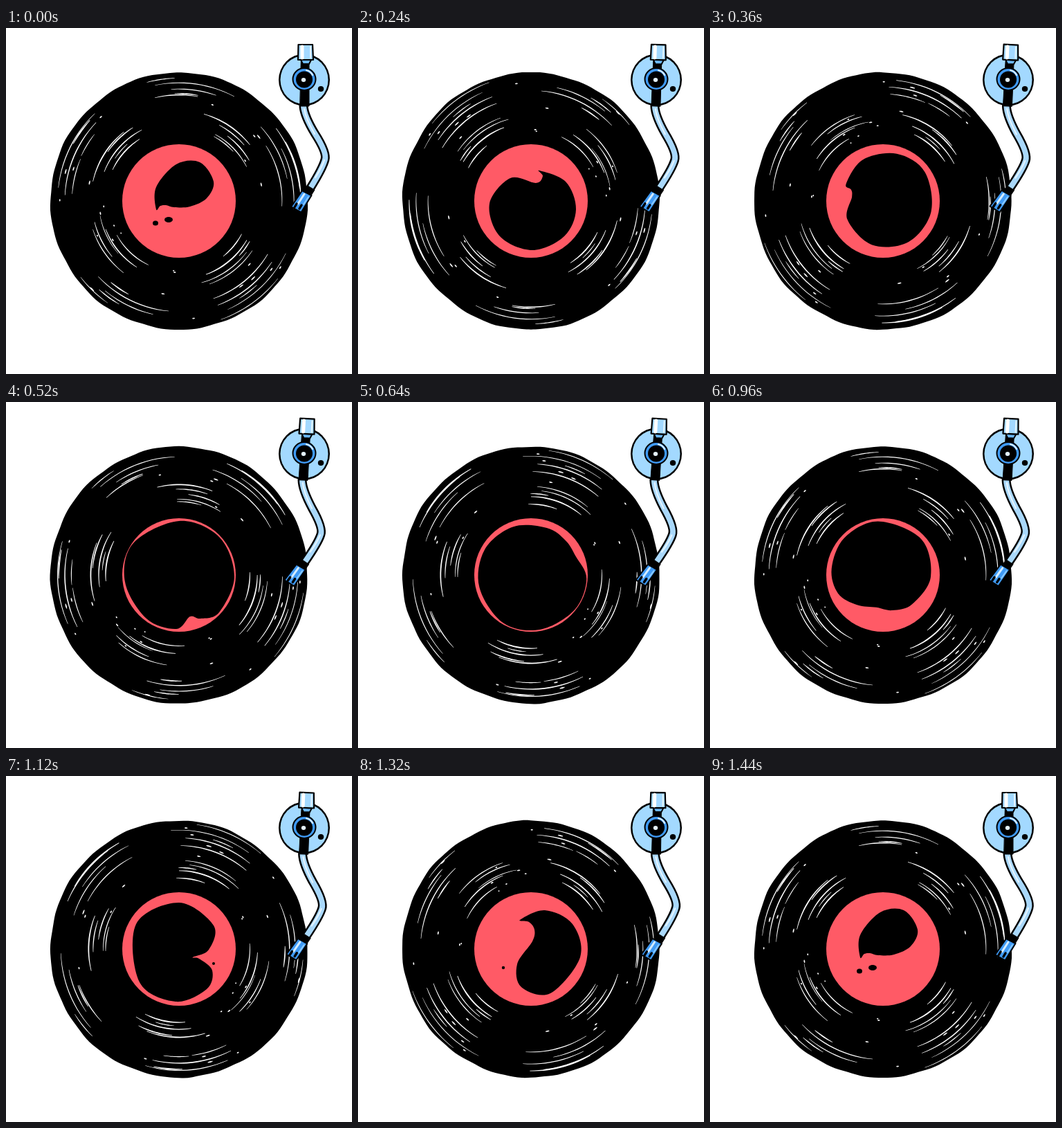
An HTML page with a canvas that plays this animation: 500x500 px, repeating every 1480 ms.

```html
<!DOCTYPE html>
<html lang="en">
<head>
<meta charset="utf-8">
<title>Spinning record</title>
<style>
  html, body { margin: 0; width: 100%; height: 100%; overflow: hidden; background: #fff; }
  canvas { display: block; width: 100vw; height: 100vh; }
</style>
</head>
<body>
<canvas id="stage" width="500" height="500"></canvas>
<script>
const ctx = document.getElementById('stage').getContext('2d');
const STEP = 40, STEPS = 37, SPIN = -30, C = 250, TAU = Math.PI * 2;
const RED = '#ff5a66', SKY = '#a3d9ff', BLUE = '#3f9af5', PALE = '#e4f4ff';
const rad = deg => deg * Math.PI / 180;
const polar = (r, deg) => [C + r * Math.cos(rad(deg)), C + r * Math.sin(rad(deg))];
const ringOf = (n, from, radius) => Array.from({ length: n }, (_, i) => {
  const deg = from + i * 360 / n;
  return polar(radius(rad(deg)), deg);
});

function seeded(seed) {
  return () => (seed = (seed * 16807) % 2147483647) / 2147483647;
}

// Ink poses: outline clockwise from its tip, and loose drops [x, y, rx, ry]
const tear = {
  at: 0,
  ink: [[217,262],[217,230],[246,197],[280,194],[300,222],
        [290,246],[266,258],[243,259],[231,256],[223,257]],
  drops: [[216,282,4,3.5],[235,277,6,4]]
};
const bowl = {
  at: 6,
  ink: [[262,206],[300,222],[315,262],[298,301],[252,321],
        [205,301],[190,254],[220,217],[257,224],[267,214]]
};
const ring = {
  at: 13,
  ink: [[246,328],[203,313],[172,260],[184,204],[250,172],
        [308,195],[330,252],[308,304],[281,313],[266,310]]
};
const full = {
  at: 20,
  ink: ringOf(10, 245, t => 82.7 - 1.4 * Math.cos(2 * t) - 0.7 * Math.cos(t + 0.5))
};
const hook = {
  at: 28,
  ink: [[279,264],[298,281],[290,308],[245,326],[193,298],
        [188,214],[250,183],[300,216],[293,251],[270,262]],
  drops: [[300,271,2,2]]
};
const comma = {
  at: 33,
  ink: [[234,208],[270,194],[310,214],[321,262],[278,314],
        [236,305],[230,272],[252,239],[255,222],[247,211]],
  drops: [[210,277,2.2,2.2]]
};
const poses = [tear, bowl, ring, full, hook, comma, { ...tear, at: 36 }];

function turn([x, y], deg) {
  const c = Math.cos(rad(deg)), s = Math.sin(rad(deg));
  return [C + (x - C) * c - (y - C) * s, C + (x - C) * s + (y - C) * c];
}

function rotated(x, y, deg, draw) {
  ctx.save();
  ctx.translate(x, y);
  ctx.rotate(rad(deg));
  ctx.translate(-x, -y);
  draw();
  ctx.restore();
}

function oval(x, y, rx, ry, fill) {
  ctx.beginPath();
  ctx.ellipse(x, y, rx, ry, 0, 0, TAU);
  ctx.fillStyle = fill;
  ctx.fill();
}

function poly(pts, fill, outline = 0) {
  ctx.beginPath();
  pts.forEach(p => ctx.lineTo(...p));
  ctx.closePath();
  ctx.fillStyle = fill;
  ctx.fill();
  if (outline) {
    ctx.strokeStyle = '#000';
    ctx.lineWidth = outline;
    ctx.stroke();
  }
}

function line(path, color, width) {
  ctx.strokeStyle = color;
  ctx.lineWidth = width;
  ctx.stroke(new Path2D(path));
}

// Closed Catmull-Rom curve
function blob(pts, fill) {
  const n = pts.length, at = i => pts[(i + n) % n];
  ctx.beginPath();
  ctx.moveTo(...pts[0]);
  for (let i = 0; i < n; i++) {
    const [a, b, c, d] = [at(i - 1), at(i), at(i + 1), at(i + 2)];
    ctx.bezierCurveTo(b[0] + (c[0] - a[0]) / 6, b[1] + (c[1] - a[1]) / 6,
                      c[0] - (d[0] - b[0]) / 6, c[1] - (d[1] - b[1]) / 6, c[0], c[1]);
  }
  ctx.fillStyle = fill;
  ctx.fill();
}

// Brush stroke along a groove, thin at both ends
function groove(r, mid, span, width) {
  const out = [], back = [], n = 14;
  for (let i = 0; i <= n; i++) {
    const a = mid + span * (i / n - 0.5);
    const w = width * (0.4 + 0.6 * Math.sin(Math.PI * i / n)) / 2;
    out.push(polar(r + w, a));
    back.unshift(polar(r - w, a));
  }
  poly(out.concat(back), '#fff');
}

// A band of light catches in evenly spaced bundles of strokes, with a few loose specks
function drawGrooves() {
  const rnd = seeded(4711);
  const between = (a, b) => a + (b - a) * rnd();
  const band = (bundles, strokes, r0, r1, first) => {
    for (let b = 0; b < bundles; b++) {
      const mid = first + b * 360 / bundles + between(-8, 8);
      for (let s = 0; s < strokes; s++) {
        const r = r0 + (r1 - r0) * (s + rnd()) / strokes;
        groove(r, mid + between(-12, 12), between(10, 42), between(1, 2));
      }
    }
  };
  band(4, 5, 102, 132, -135);
  band(5, 5, 148, 182, -85);
  for (let i = 0; i < 26; i++) groove(between(92, 180), between(0, 360), between(1, 3), 1.8);
}

function drawRecord() {
  blob(ringOf(90, 0, t => 185.8 + 0.5 * Math.sin(9 * t) + 0.4 * Math.sin(23 * t)), '#000');
  drawGrooves();
}

// Blend neighbouring poses in the turning frame of the record
function inkAt(step) {
  const i = Math.min(poses.findLastIndex(p => p.at <= step), poses.length - 2);
  const a = poses[i], b = poses[i + 1], u = (step - a.at) / (b.at - a.at);
  return a.ink.map((p, k) => {
    const [x0, y0] = turn(p, SPIN * (step - a.at));
    const [x1, y1] = turn(b.ink[k], SPIN * (step - b.at));
    return [x0 + (x1 - x0) * u, y0 + (y1 - y0) * u];
  });
}

function drawLabel(step) {
  const near = poses.reduce((a, b) => Math.abs(b.at - step) < Math.abs(a.at - step) ? b : a);
  oval(C, C, 82, 82, RED);
  blob(inkAt(step), '#000');
  rotated(C, C, SPIN * (step - near.at), () => {
    (near.drops || []).forEach(d => oval(...d, '#000'));
  });
}

function drawArm() {
  const tube = 'M430 113 Q431 127 446 152 Q464 180 461 190 Q458 202 440 231';
  line(tube, '#000', 13);
  line(tube, '#a9d8fb', 8);
  line('M431 117 Q433 131 446 153 M460 191 Q456 202 447 216', PALE, 2.2);

  poly([[426, 48], [438, 48], [438, 113], [425, 113]], '#000', 1);
  poly([[426, 46], [441, 46], [438, 52], [429, 52]], '#6bb8f8', 2);
  poly([[422.5, 24], [443, 24], [444, 46], [422, 46]], SKY, 2.2);
  line('M428 27 V43', '#fff', 5);
  line('M440 27 V43', PALE, 2);

  poly([[436, 228], [446, 234], [441, 242], [430, 236]], '#000', 1);
  poly([[428, 235], [441.5, 242], [426.5, 266.5], [412, 258.5]], BLUE, 2);
  line('M431 240 L422 254', '#d3ecff', 3);
  line('M437 244 L430 255', '#8ccaff', 2);
  line('M420 254 L417 259 M427 256 L424 261', '#000', 3.4);
}

function drawTurntableArm(step) {
  const x = 431, y = 75;
  ctx.lineJoin = ctx.lineCap = 'round';
  oval(x, y, 37, 37.5, '#000');
  oval(x, y, 34.5, 35, SKY);
  oval(455, 88, 4.2, 4, '#000');
  rotated(x, y, 3.3 * Math.sin(Math.PI * step / 36), drawArm);
  oval(x, y - 1, 17.5, 17, '#000');
  oval(x, y - 1, 15.5, 15, BLUE);
  oval(x, y - 0.5, 12, 12, '#000');
  oval(x - 1, y, 3.2, 3, PALE);
  line('M434 61 Q440 62 443 68', PALE, 2);
}

function draw(step) {
  ctx.fillStyle = '#fff';
  ctx.fillRect(0, 0, 500, 500);
  rotated(C, C, SPIN * step, drawRecord);
  drawLabel(step);
  drawTurntableArm(step);
}

const start = performance.now();
let shown = -1;
function tick() {
  const step = Math.floor((performance.now() - start) / STEP) % STEPS;
  if (step !== shown) draw(shown = step);
  requestAnimationFrame(tick);
}
tick();
</script>
</body>
</html>
```
